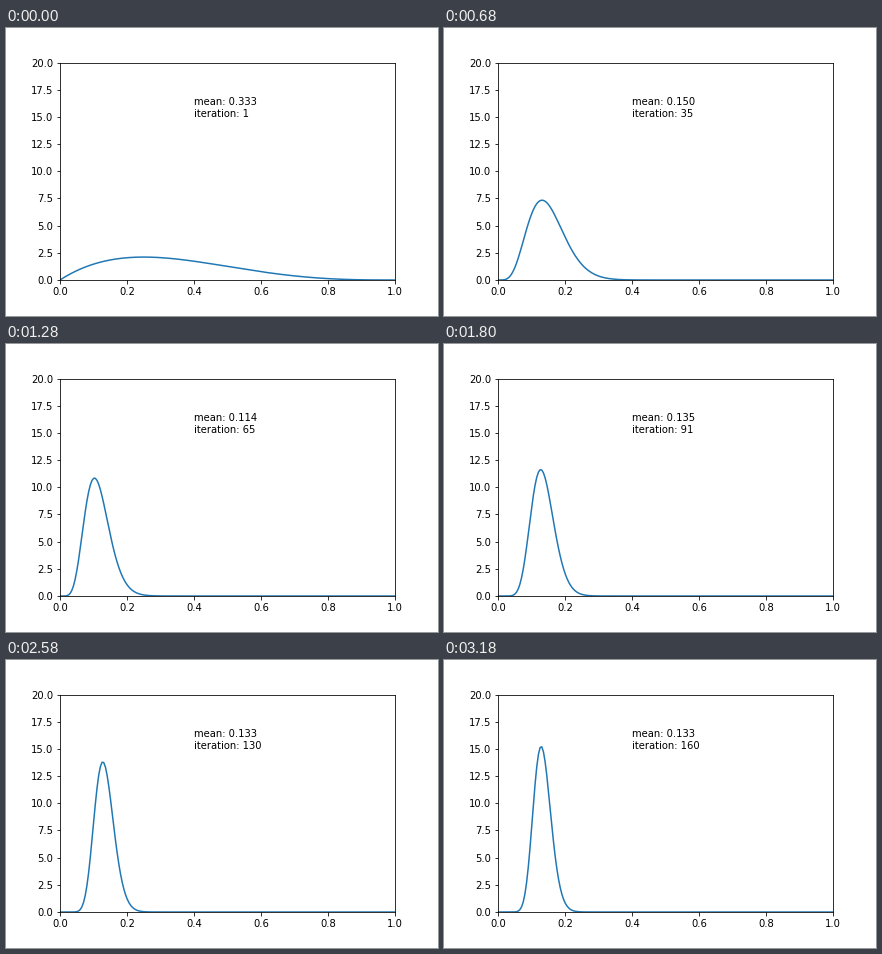
Recreate the animation shown at these times as a matplotlib script. Size 432 by 288 pixels, loop 3.2 s.

```python
from math import exp, lgamma

import matplotlib.pyplot as plt
import numpy as np
from matplotlib.animation import FuncAnimation

FRAMES = 160
INTERVAL = 20
PRIOR_A, PRIOR_TOTAL = 2, 5

# Trials that count as a success; all the others are failures.
HITS = [6, 12, 18, 24, 58, 62, 70, 74, 79, 85, 89, 101,
        118, 121, 125, 128, 147, 151, 154, 158]

plt.rcParams["font.family"] = "DejaVu Sans"
fig, ax = plt.subplots(figsize=(6, 4), dpi=72)
fig.subplots_adjust(left=0.125, right=0.9, bottom=0.125, top=0.88)
ax.set_xlim(0, 1)
ax.set_ylim(0, 20)

x = np.linspace(0, 1, 200)
line, = ax.plot([], [], lw=1.5)
label = ax.text(0.4, 15, "", fontsize=10)


def beta_pdf(a, b):
    scale = exp(lgamma(a + b) - lgamma(a) - lgamma(b))
    return scale * x ** (a - 1) * (1 - x) ** (b - 1)


def update(i):
    n = i + 1
    a = PRIOR_A + sum(hit <= n for hit in HITS)
    total = PRIOR_TOTAL + n
    line.set_data(x, beta_pdf(a, total - a))
    label.set_text(f"mean: {a / total:.3f}\niteration: {n}")
    return line, label


anim = FuncAnimation(fig, update, frames=FRAMES, interval=INTERVAL,
                     repeat=True, repeat_delay=0)
plt.show()
```
